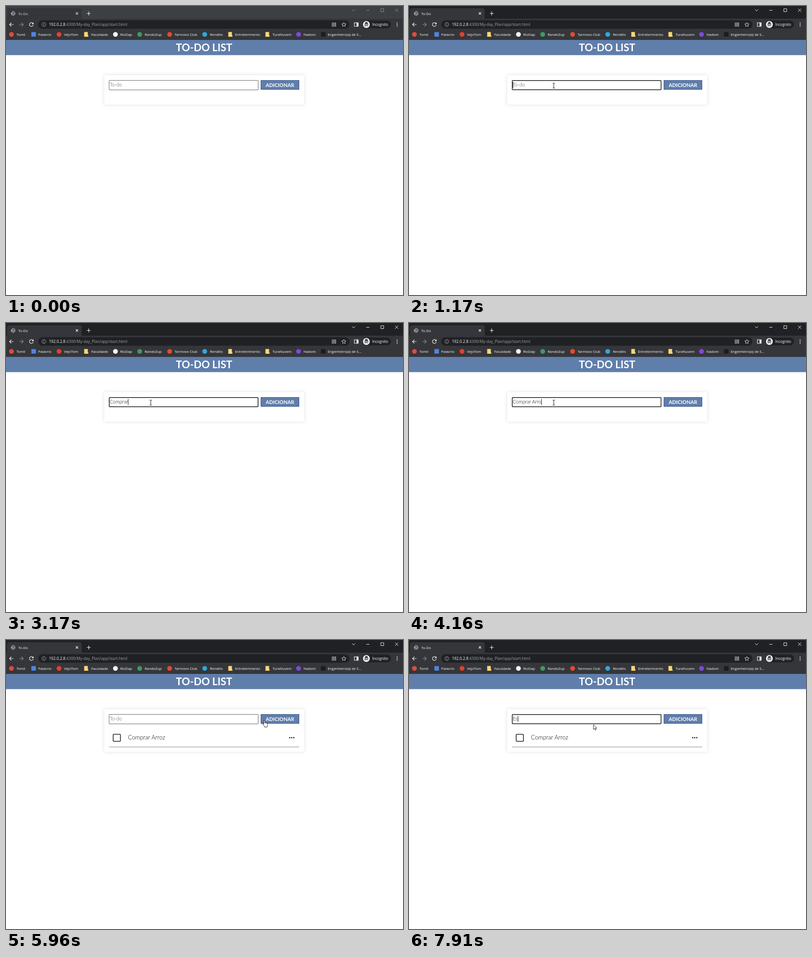
These frames come from a looping animation (876 px wide and 639 px high, 8000 ms). An HTML page:

```html
<!DOCTYPE html>
<html lang="pt-BR">
<head>
<meta charset="utf-8">
<title>To-Do</title>
<style>
  html, body { margin: 0; width: 100%; height: 100%; overflow: hidden; background: #fff; }
  svg { display: block; width: 100%; height: 100%; }
  text { white-space: pre; }
  .ui { font: 500 7.8px "Open Sans", "Noto Sans", sans-serif; fill: #fff; }
  .url { font-size: 8.6px; }
  .bold { font-family: Lato, sans-serif; font-weight: 700; fill: #fff; text-anchor: middle; }
  .light { font-family: Lato, sans-serif; font-weight: 300; fill: #000; }
  .line { fill: none; stroke: #f1f1f2; stroke-width: 1.2; }
  #card { filter: drop-shadow(0 0 4px rgba(0, 0, 0, .12)); }
</style>
</head>
<body>
<svg viewBox="0 0 876 639">
  <!-- tab strip -->
  <rect id="strip" width="876" height="29"/>
  <path d="M0 28.500q2 0 2-3V10q0-5 5-5H162q5 0 5 5V25.500q0 3 3 3z" fill="#35363a"/>
  <circle cx="15.800" cy="16.500" r="5" fill="#9aa0a6"/>
  <path d="M12 13.500l3 .5 1.500 2.500-2 1.500-.5 2.500M18 12.500l-1 2 3 1.500M17 20l2-2" fill="none" stroke="#45474b" stroke-width="1.300"/>
  <text id="tabText" class="ui" x="27" y="19.500">To-Do</text>
  <path id="tabClose" class="line" d="M154 14l5 5m0-5l-5 5"/>
  <path class="line" d="M178.300 16.500h8.400M182.500 12.300v8.400"/>
  <path id="controls" d="M763.500 7.500l3.500 3.500 3.500-3.500M795 9.500h7M827 6h6.500v6.500H827zM858.500 5.800l7 7m0-7l-7 7" fill="none"/>

  <!-- toolbar -->
  <rect y="28" width="876" height="47" fill="#35363a"/>
  <rect x="71" y="31.500" width="687" height="18.800" rx="9.400" fill="#202124"/>
  <path class="line" d="M16.500 41H7.800m4-4l-4 4 4 4"/>
  <path class="line" d="M29.500 41h8.700m-4-4l4 4-4 4" style="stroke:#8b8d90"/>
  <path class="line" d="M59.600 38.700a4.200 4.200 0 1 0 .5 3.200"/>
  <path d="M60.800 36v4.200h-4.200z" fill="#f1f1f2"/>
  <g fill="none" stroke="#a7aaae">
    <circle cx="83.500" cy="41" r="4.300"/>
    <path d="M83.500 40.300v3.200M83.500 38.300v1.100"/>
  </g>
  <text class="ui url" x="94.700" y="44.200">192.0.2.8<tspan fill="#a0a4a9">:4300/My-day_Plan/app/start.html</tspan></text>
  <path d="M720 36.500v9M723.500 36.500v9M727 36.500v9M719 38h9.500M719 41h9.500M719 44.500h9.500" stroke="#b9bbbe" stroke-width="1.300" stroke-dasharray="2 .8"/>
  <path id="star" fill="none" stroke="#dcdde0"/>
  <path class="line" d="M768.700 37.200h8.400v7.800h-8.400z"/>
  <path d="M773.500 37h3.800v8h-3.800z" fill="#f1f1f2"/>
  <rect x="786.500" y="32" width="63" height="17.500" rx="8.750" fill="#202124"/>
  <circle cx="795.200" cy="40.800" r="7.600" fill="#f4f4f5"/>
  <path d="M790.500 40h9.400M792.500 39l.8-3h3.800l.8 3z" fill="#35363a" stroke="#35363a"/>
  <path d="M794.500 43a1.500 1.500 0 1 1-3 0 1.500 1.500 0 1 1 3 0h1.400a1.500 1.500 0 1 1 3 0 1.500 1.500 0 1 1-3 0" fill="none" stroke="#35363a"/>
  <text class="ui" x="808" y="43.700" style="font-size:8.1px">Incognito</text>
  <g fill="#f1f1f2"><circle cx="863" cy="37.500" r="1.100"/><circle cx="863" cy="41" r="1.100"/><circle cx="863" cy="44.500" r="1.100"/></g>
  <g id="marks"></g>

  <!-- page -->
  <rect y="75" width="876" height="33.600" fill="#607eaa"/>
  <text class="bold" x="437" y="100.200" font-size="22.500">TO-DO LIST</text>
  <rect id="card" x="217" y="153" width="441" fill="#fff"/>
  <rect id="field" fill="#fff"/>
  <text id="value" class="light" x="229" y="177.700" font-size="10.700"></text>
  <rect id="caret" y="168" width="1" height="13" fill="#111"/>
  <rect x="562.500" y="164.500" width="84" height="20" fill="#607eaa" stroke="#34508f"/>
  <text class="bold" x="604.500" y="178.800" font-size="11.200">ADICIONAR</text>
  <g id="item">
    <rect x="236.500" y="208.500" width="16" height="15.500" rx="1.500" fill="#fff" stroke="#1a1a1a" stroke-width="1.600"/>
    <text class="light" x="269.300" y="220" font-size="13">Comprar Arroz</text>
    <g fill="#111"><circle cx="626" cy="216" r="1.400"/><circle cx="630.500" cy="216" r="1.400"/><circle cx="635" cy="216" r="1.400"/></g>
    <path d="M227.500 236.500H647" stroke="#858585"/>
  </g>

  <!-- pointers, hot spot at 0,0 -->
  <g id="pointer">
    <path id="arrow" d="M0 0V10.800L2.500 8.600 4.200 12.400 5.900 11.600 4.200 8H7.600z" fill="#fff" stroke="#111" stroke-width=".9"/>
    <path id="beam" d="M-2.500-5.500h1.700q.8 0 .8.800V4.700q0 .8-.8.800H-2.500M2.500-5.500H.8Q0-5.500 0-4.700V4.700q0 .8.800.8H2.500" fill="none" stroke="#111"/>
    <path id="hand" d="M-1 1Q-1-.5.200-.5T1.400 1V5L6 6Q7.400 6.400 7.200 8L6.300 12.500V14.500H.5V13L-3.500 8.500Q-3.500 6.800-1.900 7.300L-1 8.300z" fill="#fff" stroke="#111" stroke-width=".9"/>
  </g>
</svg>
<script>
const LOOP = 8000, TICK = 68, BLINK = 520;
const $ = id => document.getElementById(id);
const set = (id, attrs) => {
  for (const k in attrs) $(id).setAttribute(k, attrs[k]);
};
const show = (id, on) => { $(id).style.display = on ? "" : "none"; };

// icon centre, label start, label, shape, colour
const bookmarks = [
  [12, 23, "Tomil", "dot", "#e04a3f"],
  [61, 71, "Palavrio", "box", "#4c86e0"],
  [117, 128, "VejoTom", "dot", "#e5402a"],
  [177, 188, "Faculdade", "folder", "#fbd775"],
  [241.5, 252, "RioDap", "dot", "#f4f4f5"],
  [295, 306, "RandoZup", "dot", "#3f9a63"],
  [361, 372, "Tarmovo Club", "dot", "#e8492c"],
  [438.5, 450, "Rendilis", "dot", "#2fa8e0"],
  [495, 505.5, "Entreterimento", "folder", "#fbd775"],
  [577, 588, "TuraNuvem", "folder", "#fbd775"],
  [645.5, 656.5, "Nadom", "dot", "#8047e0"],
  [700, 710, "Engenheiro(a) de S...", "box", "#1c1c1f"]
];
const icons = {
  dot: (x, c) => `<circle cx="${x}" cy="62.700" r="5.300" fill="${c}"/>`,
  box: (x, c) => `<rect x="${x - 5}" y="57.700" width="10" height="10" fill="${c}"/>`,
  folder: (x, c) => `<path d="M${x - 4.5} 57.500h8v7h1v3.500h-9z" fill="${c}"/>`
};
$("marks").innerHTML = bookmarks.map(([x, tx, label, shape, color]) =>
  icons[shape](x, color) + `<text class="ui" x="${tx}" y="65.700">${label}</text>`).join("");

const star = Array.from({ length: 10 }, (_, i) => {
  const a = i * Math.PI / 5, r = i % 2 ? 2.3 : 5;
  return (745.5 + r * Math.sin(a)).toFixed(1) + " " + (41.3 - r * Math.cos(a)).toFixed(1);
});
set("star", { d: "M" + star.join("L") + "z" });

// keys[n] is when n characters are in the field; keys[0] is the focus
const entries = [
  { text: "Comprar Arroz", blur: 5500, end: 5570,
    keys: [1170, 2100, 2370, 2570, 2770, 2870, 2970, 3170, 3300, 3700, 3900, 4030, 4160, 4370] },
  { text: "Es", blur: LOOP, end: LOOP, keys: [6510, 7640, 7910] }
];

// each move: time, x, y
const moves = [
  [[200, 604, 604], [400, 502, 432], [600, 405, 272], [760, 345, 200], [948, 319.5, 176]],
  [[4890, 319.5, 176], [5026, 420, 172], [5230, 559, 160], [5434, 582, 178]],
  [[5890, 577, 178], [5958, 570, 178], [6094, 500, 176], [6230, 421, 177]],
  [[7108, 407, 187]]
];

function pointerAt(t) {
  const path = moves.filter(m => m[0][0] <= t).pop();
  if (!path) return null;
  const start = path[0][0];
  const q = start + Math.floor((t - start) / TICK) * TICK;
  const i = path.findIndex(k => k[0] > q);
  if (i < 0) return path[path.length - 1].slice(1);
  const [t0, x0, y0] = path[i - 1], [t1, x1, y1] = path[i];
  const f = (q - t0) / (t1 - t0);
  return [x0 + (x1 - x0) * f, y0 + (y1 - y0) * f];
}

function drawPointer(t) {
  const p = pointerAt(t);
  show("pointer", p);
  if (!p) return false;
  const [x, y] = p;
  const inRow = y >= 164 && y <= 185;
  const overField = inRow && x >= 227 && x <= 557;
  const overButton = inRow && x >= 562 && x <= 647;
  set("pointer", { transform: `translate(${x} ${y})` });
  show("beam", overField);
  show("hand", overButton);
  show("arrow", !overField && !overButton);
  return overField;
}

function drawField(t, hover) {
  const entry = entries.find(e => t >= e.keys[0] && t < e.end);
  const done = entry ? entry.keys.filter(k => k <= t) : [];
  const text = entry ? entry.text.slice(0, done.length - 1) : "";
  const focus = !!entry && t < entry.blur;
  const value = $("value");
  value.textContent = text || "To-do";
  value.style.fill = text ? "#000" : "#454a48";
  const w = focus ? 1.5 : 1;
  set("field", {
    x: 227 + w / 2, y: 164 + w / 2, width: 330 - w, height: 22 - w, rx: 1.5,
    "stroke-width": w, stroke: focus ? "#101010" : hover ? "#484848" : "#626262"
  });
  const lit = focus && Math.floor((t - done[done.length - 1]) / BLINK) % 2 === 0;
  show("caret", lit);
  if (lit) set("caret", { x: Math.round(229 + (text ? value.getComputedTextLength() : 0)) });
}

function draw(t) {
  const active = t >= 1170, added = t >= 5570;
  set("strip", { fill: active ? "#202124" : "#3c4043" });
  $("tabText").style.fill = active ? "#fff" : "#d6d8da";
  $("tabClose").style.stroke = active ? "#f1f1f2" : "#d0d2d4";
  set("controls", { stroke: active ? "#f1f1f2" : "#8d9093" });
  set("card", { height: added ? 94 : 65 });
  show("item", added);
  drawField(t, drawPointer(t));
}

const begin = performance.now();
function frame() {
  draw((performance.now() - begin) % LOOP);
  requestAnimationFrame(frame);
}
frame();
</script>
</body>
</html>
```
